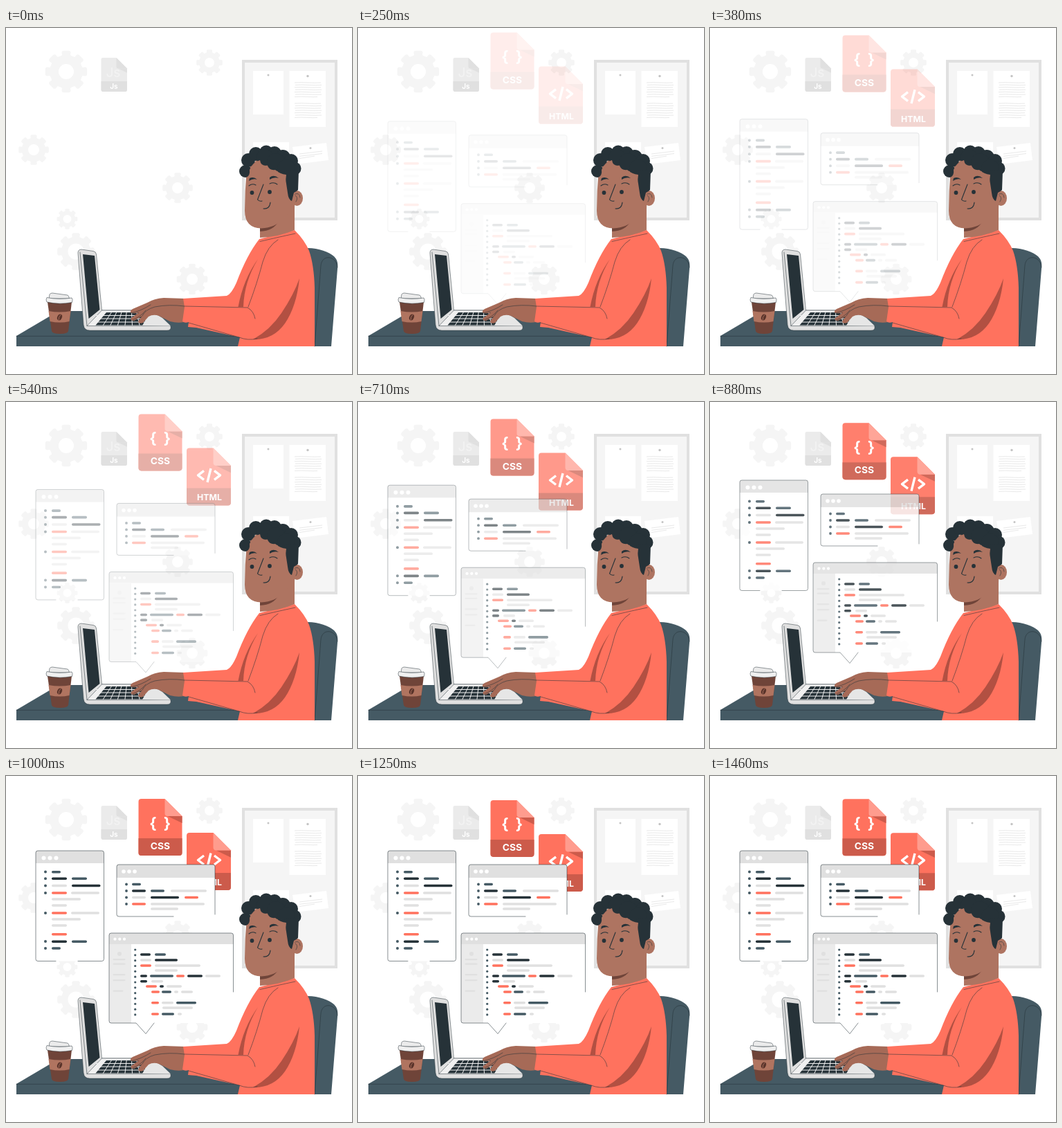
These frames come from a looping animation (500x500 px, 1500 ms). An HTML page:

```html
<!DOCTYPE html>
<html lang="en">
<head>
<meta charset="utf-8">
<title>Coding at the desk</title>
<style>
html, body { margin: 0; width: 100%; height: 100%; overflow: hidden; background: #fff; }
svg { display: block; width: 100%; height: 100%; }
text { font-family: Inter, "Open Sans", sans-serif; font-weight: 700; fill: #fff; text-anchor: middle; }
.ln { fill: none; stroke: #263238; stroke-width: .55; stroke-linecap: round; stroke-linejoin: round; }
.sign { fill: none; stroke: #fff; stroke-width: 3.4; stroke-linejoin: round; }
.ol { stroke: #263238; stroke-width: .5; stroke-linejoin: round; }
</style>
</head>
<body>
<svg viewBox="0 0 500 500">
  <g id="gears" fill="#f5f5f5" fill-rule="evenodd"></g>

  <g id="board">
    <rect x="343" y="48" width="134" height="228" fill="#f5f5f5" stroke="#e0e0e0" stroke-width="4"/>
    <path fill="#fff" d="M357 62h44v63h-44zM409.500 62h52.500v81h-52.500zM357 165h52v38h-52zM414 172L463 166 466 191 418 197z"/>
    <g fill="#c4c4c4"><circle cx="379" cy="68" r="1.5"/><circle cx="436" cy="69.500" r="1.700"/><circle cx="440" cy="173.500" r="1.500"/></g>
    <path id="notes" fill="none" stroke="#d8d8d8" stroke-width=".6"/>
  </g>

  <g id="jsDoc"></g>
  <g id="icons">
    <g id="cssDoc"></g>
    <g id="htmlDoc"></g>
  </g>
  <g id="wins"></g>

  <g id="chair">
    <path fill="#455a64" d="M436 318C452 318 467 324 474 330 479 335 480 340 479 348L470 460H440z"/>
    <path class="ln" d="M479 346C478 329 457 326 455 343L446 460"/>
  </g>

  <g id="desk">
    <path fill="#455a64" d="M15 445L76 409H345V460H15z"/>
    <path class="ln" d="M15 445.300H336"/>
  </g>

  <g id="cup">
    <path fill="#6f4439" d="M60 396H95L90 438Q89 442 78 442T66 438z"/>
    <path fill="#b07460" d="M61.500 409Q78 412 93.500 409L91.500 424Q78 427 63.500 424z"/>
    <g transform="rotate(25 77.500 418)"><ellipse cx="77.500" cy="418" rx="3.300" ry="4.600" fill="#5a342b"/><path d="M77.500 414Q75.500 418 78 422" fill="none" stroke="#b07460" stroke-width=".8"/></g>
    <path class="ol" fill="#ebebeb" d="M62 391L63 385Q64 383 67 383L89 386Q91 387 91.500 391z"/>
    <path class="ol" fill="#f0f0f0" d="M59 389.500Q77 393 95 390 97 392 95.500 396.500 77 400 59 396 57 393 59 389.500z"/>
  </g>

  <g id="laptop">
    <path class="ol" fill="#e0e0e0" d="M104 325Q104 320 109 320L126 322.500Q130 323 130.500 327L138.500 408 205 408 238 431Q239 437 233 437H121Q113 437 112 429z"/>
    <path class="ol" fill="#f0f0f0" d="M117 430.500L138.500 408H205L238 430.500z"/>
    <path class="ln" d="M107 324L117 430.500"/>
    <path fill="#263238" d="M111 327L128 329 135.500 407 119.500 420z"/>
    <path fill="#263238" d="M145 411H196L204 429.500H129.500z"/>
    <path id="keys" fill="none" stroke="#f0f0f0" stroke-width="1"/>
    <path fill="#e6e6e6" d="M197 430L205 416 216 413 226 419 238 430.500z"/>
  </g>

  <g id="hands">
    <path fill="#a66a57" d="M258 391L228 390Q214 391 204 397L183 406Q178 409 181 412 186 413 192 411L181 419Q179 423 185 423L204 412 235 407H258z"/>
    <path class="ln" d="M181 412Q195 409 209 400M183 422Q195 417 202 408"/>
    <path fill="#a66a57" d="M259 402L240 400Q219 400 209 405 199 410 196 417L191 424Q192 428 198 426L206 417Q213 413 221 416L237 424Q248 427 257 425z"/>
    <path class="ln" d="M197 416Q201 407 215 403 236 399 258 402"/>
  </g>

  <g id="body">
    <path fill="#ff725e" d="M366 305L417 292Q432 307 438 322 445 342 446 375V460H335L338 447 275 433 263 432 264 425Q258 427 255 424L258 403 256 391 319 387Q326 384 333 368 348 328 366 305z"/>
    <path fill="#b25042" d="M424 362Q416 385 398 412 382 436 357 450 386 451 403 427 420 402 424 362z"/>
    <path fill="#b25042" d="M364 334Q343 363 335.500 403H343Q344 367 364 334z"/>
    <path class="ln" d="M393 306Q378 315 371 338 363 369 350 403"/>
    <path class="ln" d="M258 402L349 404Q358 409 360 420M264 426L337 447Q349 452 363 449M367 308.500Q390 303 418 297"/>
  </g>

  <g id="head">
    <path fill="#ae7461" d="M367 270L400 245H417V292Q394 302 367 303z"/>
    <path fill="#6f4439" d="M367 287L394 279Q387 293 367 294z"/>
    <ellipse cx="420.500" cy="246" rx="8.500" ry="11" fill="#ae7461"/>
    <path class="ln" d="M416 241Q424 236 425 245M418 242Q423 245 419 251"/>
    <path fill="#ae7461" d="M348 205Q345 235 345 264 345 289 369 289.500 390 288 398 277L417 262 418 215 400 188H365z"/>
    <g id="hair" fill="#263238"></g>
    <path fill="#ae7461" d="M347.500 216Q353 213 352 205 356 194 367 191 368 199 376 199 381 206 389 205 396 211 405 212L404 222H347.500z"/>
    <path fill="#263238" d="M352 217Q358 214 363 219 357 217 351 221zM381 216Q387 211 394 217 387 215 381 219z"/>
    <circle cx="355.500" cy="238" r="2.900" fill="#263238"/><circle cx="381" cy="237" r="2.900" fill="#263238"/>
    <path class="ln" d="M351 228Q356 224 361 227M381 225Q387 222 392 226M372 226L363.500 248Q366 251 370 250M372 261Q381 262 382 252" style="stroke-width:1.100"/>
  </g>
</svg>
<script>
const $ = id => document.getElementById(id);
const DARK = '#263238', MID = '#455a64', RED = '#ff725e', PALE = '#e0e0e0';

// Gears: eight teeth around a ring with a round hole
function gear(cx, cy, R, hole) {
  const pt = (r, a) => (cx + r * Math.cos(a)).toFixed(2) + ' ' + (cy + r * Math.sin(a)).toFixed(2);
  let d = '';
  for (let i = 0; i < 8; i++) {
    const a = i * Math.PI / 4, r = R * .8;
    d += (i ? 'L' : 'M') + pt(r, a - .25) + 'L' + pt(R * .94, a - .23) + 'Q' + pt(R, a - .2) + ' ' + pt(R, a - .13) +
      'L' + pt(R, a + .13) + 'Q' + pt(R, a + .2) + ' ' + pt(R * .94, a + .23) + 'L' + pt(r, a + .25) +
      'Q' + pt(R * .76, a + Math.PI / 8) + ' ' + pt(r, a + Math.PI / 4 - .25);
  }
  return `<path d="${d}ZM${cx - hole} ${cy}a${hole} ${hole} 0 1 0 ${2 * hole} 0a${hole} ${hole} 0 1 0 ${-2 * hole} 0Z"/>`;
}
$('gears').innerHTML = [
  [87, 63, 30.5, 11], [294, 50, 19, 7], [40, 176, 22, 8], [248, 231, 22, 8],
  [88.5, 276, 15, 6], [101, 323, 27, 11.5], [269, 363, 22.5, 8]
].map(g => gear(...g)).join('');

let notes = '';
for (let i = 0; i < 7; i++)
  for (const y of [79, 109])
    notes += `M${417 + i % 2} ${y + i * 3.4}q10 -.6 19 0t${i === 6 ? 14 : 19} 0`;
for (let i = 0; i < 3; i++) notes += `M424 ${182 + i * 3.3}L${i === 2 ? 446 : 457} ${178 + i * 3.5}`;
$('notes').setAttribute('d', notes);

let keys = '';
for (let i = 1; i < 7; i++) keys += `M${145 + i * 7.3} 411L${129.5 + i * 10.6} 430`;
for (const y of [415.5, 420, 425]) keys += `M130 ${y}H204`;
$('keys').setAttribute('d', keys);

$('hair').innerHTML = [
  [346, 207, 9], [350, 191, 10], [361, 182, 10], [376, 179, 9.5], [388, 181, 10], [400, 187, 11],
  [412, 192, 10], [417, 203, 9.5], [374, 187, 12], [390, 194, 13], [405, 203, 13]
].map(([x, y, r]) => `<circle cx="${x}" cy="${y}" r="${r}"/>`).join('') +
  '<path d="M402 205L423 206 422 234Q420 236 416 238L413 250Q408 248 407 238z"/>';

// File with a folded corner and a label band
function file(x, y, w, h, fold, band, body, shade, foldFill) {
  const r = h / 20, b = y + h, e = x + w;
  return `<path fill="${body}" d="M${x + r} ${y}H${e - fold}L${e} ${y + fold}V${b - r}q0 ${r} ${-r} ${r}H${x + r}q${-r} 0 ${-r} ${-r}V${y + r}q0 ${-r} ${r} ${-r}z"/>` +
    `<path fill="${shade}" d="M${x} ${b - band}H${e}V${b - r}q0 ${r} ${-r} ${r}H${x + r}q${-r} 0 ${-r} ${-r}z"/>` +
    `<path fill="${shade}" d="M${e - fold + r} ${y + fold}H${e}v${fold * .4}z"/>` +
    `<path fill="${foldFill}" d="M${e - fold} ${y}L${e} ${y + fold}H${e - fold + r}q${-r} 0 ${-r} ${-r}z"/>`;
}
const label = (x, y, size, s, extra = '') => `<text x="${x}" y="${y}" font-size="${size}" ${extra}>${s}</text>`;

$('jsDoc').innerHTML = file(137.5, 43, 37.5, 49, 15.5, 15, '#ebebeb', PALE, PALE) +
  label(155, 70.5, 19, 'Js', 'style="fill:#f2f2f2;font-weight:500"') + label(156, 87.5, 10, 'Js');
$('cssDoc').innerHTML = file(191.5, 33, 63, 82, 25, 25, RED, '#cc5b4b', '#ff9c8e') +
  label(212.5, 75.5, 22, '{') + label(233, 75.5, 22, '}') + label(223, 106, 13.8, 'CSS');
$('htmlDoc').innerHTML = file(261, 82, 64, 83, 25.5, 25, RED, '#cc5b4b', '#ff9c8e') +
  '<path class="sign" d="M286 115L277.500 121.500 286 128M301 115L309.500 121.500 301 128M296 111.500L291 131.500"/>' +
  label(294, 158, 12.3, 'HTML');

// Windows
const bar = (y, col, a, b) => `<rect x="${a}" y="${y - 1.8}" width="${b - a}" height="3.600" rx="1.700" fill="${col}"/>`;
const row = (y, ...parts) => parts.map(([col, a, b]) => bar(y, col, a, b)).join('');
const dots = (xs, y, r) => xs.map(x => `<circle cx="${x}" cy="${y}" r="${r}" fill="#fff"/>`).join('');
const bullets = (x, ys, r) => ys.map(y => `<circle cx="${x}" cy="${y}" r="${r}" fill="${MID}"/>`).join('');
const panel = (x, y, w, h, top) =>
  `<rect x="${x}" y="${y}" width="${w}" height="${h}" rx="3" fill="#fff"/>` +
  `<path fill="${PALE}" d="M${x} ${y + top}v${3 - top}q0 -3 3 -3h${w - 6}q3 0 3 3v${top - 3}z"/>`;
const edge = d => `<path class="ln" d="${d}"/>`;

const block = y => row(y, [RED, 66, 88], [PALE, 94, 135]) + row(y + 9, [PALE, 66, 108]) + row(y + 18, [PALE, 66, 88]);
const tall = panel(43, 108, 98.5, 159.5, 18) + dots([54.5, 63.5, 72.5], 118.5, 3) +
  bullets(57, [138.5, 148.2, 158.5, 169, 198, 239, 249], 2) +
  row(138.7, [MID, 66, 79]) + row(148.2, [DARK, 66, 88], [MID, 95, 117]) +
  row(158.5, [PALE, 66, 88], [DARK, 95, 136.5]) + block(169) + block(198) + row(228.7, [RED, 66, 88]) +
  row(239.2, [DARK, 66, 88], [MID, 95, 117]) + row(249, [MID, 66, 79]) +
  edge('M72 267.500H46q-3 0-3-3V111q0-3 3-3h92.500q3 0 3 3V264.500q0 3-3 3H104');

const small = panel(160, 128, 142, 75, 19) + dots([170, 178, 186], 138, 2.8) +
  bullets(174, [156.5, 166, 175.5, 185], 1.9) +
  row(156.5, [MID, 182, 195]) + row(166, [DARK, 182, 202], [MID, 209, 229], [PALE, 238, 290]) +
  row(175.5, [PALE, 182, 202], [DARK, 209, 250], [RED, 258, 278]) +
  row(185, [RED, 182, 202], [PALE, 209, 287]) + row(192, [PALE, 209, 249]) +
  edge('M242 203H163q-3 0-3-3V131q0-3 3-3h136q3 0 3 3V200');

const steps = Array.from({ length: 13 }, (_, i) => 251 + i * 7.83);
const big = '<path fill="#fff" d="M187 356L202 373 215 356z"/>' + panel(149, 227, 179.5, 130, 16) +
  '<path fill="#ebebeb" d="M149 243H181V357H152q-3 0-3-3z"/>' +
  `<circle cx="164" cy="257" r="3" fill="${PALE}"/>` +
  [265, 271.5, 287, 295, 310.5].map((y, i) => `<rect x="154.500" y="${y - 1}" width="${i === 4 ? 15 : 18}" height="2.200" rx="1" fill="${PALE}"/>`).join('') +
  dots([157.5, 164.3, 171], 235.7, 2.1) + bullets(186.7, steps, 1.6) +
  row(258, [DARK, 194, 209], [MID, 215, 231]) + row(266, [PALE, 194, 210], [DARK, 215, 248]) +
  row(274, [RED, 194, 210], [PALE, 215, 281]) + row(281, [PALE, 215, 248]) +
  row(289, [DARK, 194, 204], [MID, 208, 242], [RED, 246, 258], [DARK, 262, 284], [PALE, 288, 310]) +
  row(296.7, [DARK, 194, 204], [PALE, 210, 227]) + row(304, [RED, 202, 218], [DARK, 222, 228], [PALE, 232, 254]) +
  row(312, [RED, 210, 222], [MID, 225, 239], [PALE, 243, 249], [PALE, 253, 270]) +
  row(327.7, [RED, 210, 221], [PALE, 225, 242], [MID, 246, 275]) + row(335, [PALE, 226, 270]) +
  row(344, [RED, 210, 221], [MID, 225, 243], [PALE, 248, 254]) +
  edge('M214 357L202 372.500 188 357H152q-3 0-3-3V230q0-3 3-3H325.500q3 0 3 3V312');
$('wins').innerHTML = tall + small + big;

function bezier(x1, y1, x2, y2) {
  const f = (a, b, s) => 3 * a * s * (1 - s) ** 2 + 3 * b * s * s * (1 - s) + s ** 3;
  return x => {
    if (x <= 0) return 0;
    if (x >= 1) return 1;
    let lo = 0, hi = 1;
    for (let i = 0; i < 30; i++) {
      const m = (lo + hi) / 2;
      if (f(x1, x2, m) < x) lo = m; else hi = m;
    }
    return f(y1, y2, lo);
  };
}
const easeIn = bezier(.42, 0, 1, 1), bounce = bezier(.36, -.01, .5, 1.38);

const LOOP = 1500, FPS = 24, SHIFT = 30;

function place(id, p, from, seen) {
  const g = $(id);
  g.setAttribute('opacity', seen ? Math.max(0, Math.min(1, p)).toFixed(4) : 0);
  g.setAttribute('transform', `translate(0 ${(from * (1 - p)).toFixed(3)})`);
}

// Motion runs in steps of 1/24 s; nothing shows in the first four
function draw() {
  const k = Math.floor((performance.now() % LOOP + 4) * FPS / 1000) % 36;
  const sec = (k + .5) / FPS, seen = k >= 4;
  place('wins', easeIn(sec), SHIFT, seen);
  place('icons', bounce(sec / 1.5), -SHIFT, seen);
  requestAnimationFrame(draw);
}
draw();
</script>
</body>
</html>
```
